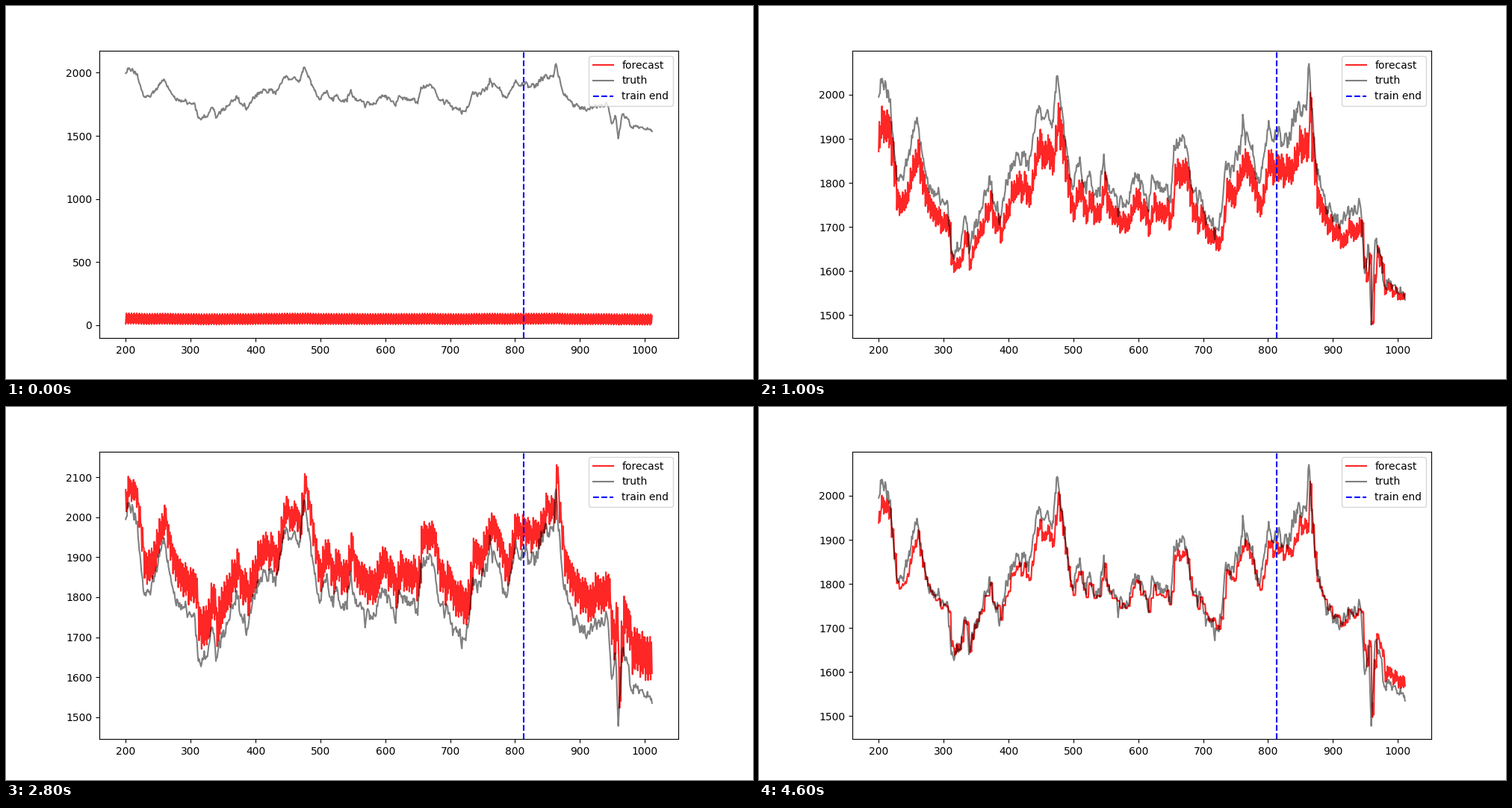
A matplotlib script that plays this animation: 1000x500 px, repeating every 4800 ms.

```python
import numpy as np
import matplotlib.pyplot as plt
from matplotlib.animation import FuncAnimation

FRAMES, INTERVAL = 24, 200
START, COUNT, SPLIT = 200, 812, 813
HORIZON = 4          # points predicted from each last known value
CENTER = 1800

# Turning points of the series: (day, value)
TURNS = [
    (0, 1995), (3, 2035), (18, 1990), (27, 1820), (40, 1835), (56, 1940),
    (74, 1810), (105, 1760), (112, 1640), (123, 1645), (133, 1725),
    (139, 1640), (170, 1812), (186, 1705), (203, 1840), (230, 1845),
    (247, 1975), (267, 1925), (275, 2043), (299, 1785), (305, 1840),
    (341, 1770), (347, 1865), (355, 1795), (381, 1745), (399, 1820),
    (416, 1735), (422, 1815), (450, 1755), (455, 1885), (473, 1885),
    (483, 1785), (521, 1695), (536, 1830), (557, 1865), (561, 1955),
    (588, 1805), (600, 1920), (630, 1880), (645, 1960), (659, 1965),
    (663, 2070), (675, 1825), (705, 1710), (743, 1740), (749, 1595),
    (755, 1655), (759, 1478), (765, 1670), (783, 1580), (811, 1535),
]


def make_truth(days):
    rng = np.random.default_rng(5)
    turn_days, values = zip(*TURNS)
    noise = np.zeros(COUNT)
    for i in range(1, COUNT):
        noise[i] = 0.65 * noise[i - 1] + rng.normal(0, 10)
    noise *= np.where(days < 783, 1, 0.5)
    noise[list(turn_days)] = 0
    return np.clip(np.interp(days, turn_days, values) + noise,
                   min(values), max(values))


days = np.arange(COUNT)
truth = make_truth(days)
known = truth[np.maximum(days // HORIZON * HORIZON - 1, 0)] - CENTER
ripple = np.array([1, -1, 0.75, -0.7])[days % HORIZON]


def bias(step):
    """Training error: damped ringing, a second burst, then settling."""
    if step > 18:
        return -13 - 10 * np.cos(np.pi * step / 2)
    even = step % 2 == 0
    swing = 9 + 180 * np.exp(-0.13 * (step - 2) ** 3)
    drift = 0 if step < 5 else -40
    burst = 99 if even and 12 <= step <= 16 else 0
    return drift + burst + (swing if even else -swing)


def predict(step):
    error = bias(max(step, 2))
    warm = min(step / 2, 1) ** 1.2

    def learn(first, last):
        return first + (last - first) * warm

    level = learn(50, CENTER + error)
    slope = learn(0.016, 0.85 + 0.0006 * error)
    amp = learn(-42, 0.5 * (error + 10) - 0.06 * known)
    return level + slope * known + amp * ripple


fig, ax = plt.subplots(figsize=(10, 5), dpi=100)
x = days + START
forecast_line, = ax.plot(x, predict(0), color="red", alpha=0.85,
                         label="forecast")
ax.plot(x, truth, color="black", alpha=0.5, label="truth")
ax.axvline(SPLIT, color="blue", linestyle="--", label="train end")
ax.legend(loc="upper right")


def draw(step):
    forecast = predict(step)
    forecast_line.set_ydata(forecast)
    low = min(truth.min(), forecast.min())
    high = max(truth.max(), forecast.max())
    pad = 0.05 * (high - low)
    ax.set_ylim(low - pad, high + pad)
    return forecast_line,


anim = FuncAnimation(fig, draw, frames=FRAMES, interval=INTERVAL,
                     init_func=lambda: draw(0), repeat=True)
plt.show()
```
